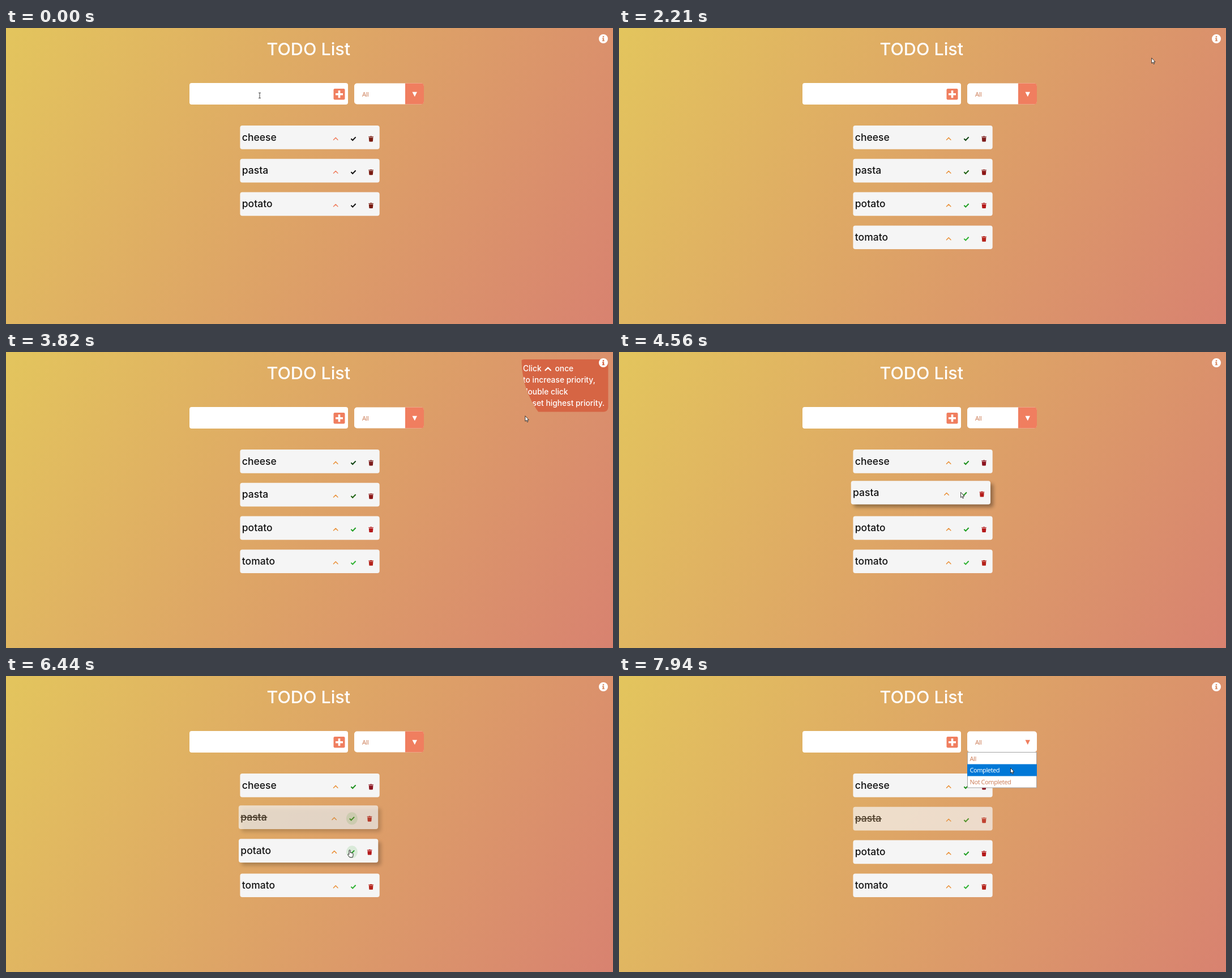
An HTML page for the animation above (8000 ms loop, 1072 by 522 pixels).

```html
<!DOCTYPE html>
<html lang="en">
<head>
<meta charset="utf-8">
<title>TODO List</title>
<style>
  html, body { margin: 0; width: 100%; height: 100%; overflow: hidden; background: #dca266; }
  svg { display: block; width: 100%; height: 100%; }
  text { white-space: pre; }
  .ui { font-family: Inter, sans-serif; font-weight: 500; }
  .form { font-family: "Noto Sans", sans-serif; letter-spacing: -.04em; }
  .opt { font-size: 11px; fill: #cf8460; }
  .line { fill: none; stroke-linecap: round; stroke-linejoin: round; }
</style>
</head>
<body>
<svg id="stage" viewBox="0 0 1072 522" preserveAspectRatio="none">
  <defs>
    <linearGradient id="bg" gradientUnits="userSpaceOnUse" x1="21" y1="-36" x2="1051" y2="558">
      <stop offset="0" stop-color="#e3c55d"/>
      <stop offset="1" stop-color="#d88270"/>
    </linearGradient>
    <filter id="blur" x="-20%" y="-60%" width="140%" height="220%"><feGaussianBlur stdDeviation="3"/></filter>
    <clipPath id="reveal"><circle id="revealDisc" cx="1065" cy="15" r="0"/></clipPath>
  </defs>
  <rect width="1072" height="522" fill="url(#bg)"/>
  <text class="ui" x="460.5" y="48" font-size="30.5" fill="#fff">TODO List</text>

  <rect x="324" y="97" width="280" height="38" rx="4" fill="#fff"/>
  <text id="typed" class="form" x="329" y="125" font-size="22"></text>
  <path id="caret" stroke="#000"/>
  <path id="addFill" d="M573 97H600Q604 97 604 101V131Q604 135 600 135H573Z" fill="#f07e5f"/>
  <rect id="addBox" x="578.5" y="107" width="20" height="19.5" rx="2.2"/>
  <path id="addPlus" d="M582 116.7H595M588.5 110.3V123.2" stroke-width="3.6"/>

  <rect x="615" y="97.5" width="123" height="37" rx="5" fill="#fff"/>
  <text class="form opt" x="629" y="120.5">All</text>
  <path id="arrowFill" d="M705 97.5H733Q738 97.5 738 102.5V129.5Q738 134.5 733 134.5H705Z" fill="#f07e5f"/>
  <path id="arrow" d="M717.5 112.8H726L721.8 121.3Z"/>

  <g id="rows"></g>

  <g id="menu">
    <rect x="615.5" y="134.5" width="122" height="62.5" fill="#fff" stroke="#a3a3a3"/>
    <rect id="pick" x="615" width="123" height="21" fill="#0078d7"/>
  </g>

  <g clip-path="url(#reveal)" fill="#fff">
    <rect x="907" y="13" width="156.5" height="92.5" rx="8" fill="#d66544"/>
    <g id="help" class="ui" font-size="13.8"></g>
    <path class="line" d="M952.5 32.3L957.2 27.6 961.9 32.3" stroke="#fff" stroke-width="2.2"/>
  </g>
  <path fill="#fff" fill-rule="evenodd" d="M1047 19a8 8 0 1 1 16 0a8 8 0 1 1-16 0Z
    M1053.6 15.3a1.4 1.4 0 1 0 2.8 0a1.4 1.4 0 1 0-2.8 0Z
    M1053 17.6H1056.2V21.8H1057.1V23.2H1052.9V21.8H1053.8V19H1053Z"/>

  <circle id="click" r="8" fill="#ffe600" opacity=".7"/>
  <g id="pointer" stroke-linejoin="round">
    <path id="beam" d="M-2-4.6H2M0-4.6V4.6M-2 4.6H2" stroke="#444" fill="none"/>
    <path id="hand" d="M-1.1 7.8V.9a1.1 1.1 0 0 1 2.2 0V4.4L4.6 5.2Q6 5.6 6 7V9.5L5 12.8H0L-3.2 8.5Q-3.5 6.8-2.2 7Z" fill="#fff" stroke="#111" stroke-width=".9"/>
    <path id="tip" d="M0 0V9.4L2.1 7.5 3.5 10.8 5 10.2 3.6 7H6.4Z" fill="#fff" stroke="#111" stroke-width=".8"/>
  </g>
</svg>
<script>
const LOOP = 8000, ADD = 1640, STRIKE = 5950, OPEN = 7330;
const CORAL = '#f07e5f', GREEN = '#12a012';
const $ = id => document.getElementById(id);
const clamp = v => Math.max(0, Math.min(1, v));
const smooth = v => (v = clamp(v), v * v * (3 - 2 * v));
const set = (el, attrs) => { for (const k in attrs) el.setAttribute(k, attrs[k]); };
const show = (el, on) => el.setAttribute('visibility', on ? 'visible' : 'hidden');
const within = (t, spans) => spans.some(([a, b]) => t >= a && t < b);

// strength of a hover that starts at a and ends at b, with a fade of d ms
const hover = (t, spans, d = 200) =>
  spans.reduce((m, [a, b]) => Math.max(m, smooth((t - a) / d) * (1 - smooth((t - b) / d))), 0);

const rows = [
  { name: 'cheese', over: [[4760, 5610], [6850, 6930]], check: [[4900, 5550]],
    tick: ['#111', '#0c4210', '#1c8f1c'], bin: ['#7a1c12', '#7d1c1c', '#8c1420'] },
  { name: 'pasta', over: [[4440, 4750], [5620, 6335], [6720, 6840]], check: [[5720, 6335]],
    tick: ['#111', '#1f6212', '#1c8f16'], bin: ['#7a1c12', '#8c1717', '#b51c1a'] },
  { name: 'potato', over: [[6350, 6710]], check: [[6350, 6640]],
    tick: ['#111', '#1d9e20', '#1d9e20'], bin: ['#7a1c12', '#b51a1c', '#b51a1c'] },
  { name: 'tomato', over: [], check: [],
    tick: ['#111', '#2bb12e', '#2bb12e'], bin: ['#7a1c12', '#b5221a', '#b5221a'] }
];

$('rows').innerHTML = rows.map((r, i) => `<g transform="translate(413.4 ${172 + i * 58.8})">
  <rect class="shade" x="5" y="5" width="246.3" height="41.7" rx="4" filter="url(#blur)"/>
  <g class="card">
    <rect width="246.3" height="41.7" rx="4" fill="#f5f5f5"/>
    <text class="ui" x="3.4" y="26.6" font-size="17.5" fill="#111">${r.name}</text>
    <path class="strike" d="M3.4 20.9H50.5" stroke="#111" stroke-width="1.5"/>
    <path class="up line" d="M165-0" stroke-width="1.5"/>
    <ellipse class="disc" cx="200" cy="23" rx="10" ry="11" fill="${GREEN}"/>
    <path class="tick" d="M196 23.2L198.8 26 204.2 20.4" fill="none" stroke-width="2"/>
    <path class="bin" transform="translate(231.2 23.4)" d="M-4.3-4.1H-1.6L-1-4.8H1L1.6-4.1H4.3V-2.9H-4.3Z
      M-3.8-2.2H3.8L3.3 4.1Q3.2 5 2.3 5H-2.3Q-3.2 5-3.3 4.1Z"/>
  </g></g>`).join('');

rows.forEach((r, i) => {
  r.el = $('rows').children[i];
  for (const part of ['shade', 'card', 'strike', 'up', 'disc', 'tick', 'bin'])
    r[part + 'El'] = r.el.querySelector('.' + part);
  r.upEl.setAttribute('d', 'M165.1 25.2L168.8 21.4 172.5 25.2');
});

$('help').innerHTML = ['Click', 'to increase priority,', 'double click', 'to set highest priority.']
  .map((s, i) => `<text x="913" y="${34.3 + i * 20.1}">${s}</text>`).join('') + '<text x="969.5" y="34.3">once</text>';

const options = ['All', 'Completed', 'Not Completed'].map((s, i) => {
  const el = document.createElementNS('http://www.w3.org/2000/svg', 'text');
  set(el, { class: 'form opt', x: 619.5, y: 149.5 + i * 20.8 });
  el.textContent = s;
  return $('menu').appendChild(el);
});

// pointer path: time, x, y
const path = [
  [0, 448, 119], [1000, 448, 119], [1350, 583, 119], [1700, 583, 119], [2310, 1010, 40],
  [2700, 1045, 23], [2820, 1060, 19], [3620, 1060, 19], [3820, 917.5, 112.5], [4410, 602, 264],
  [4700, 605, 232], [4980, 607, 194], [5530, 607, 194], [5540, 607, 204], [5640, 607, 222],
  [5800, 607, 250], [6240, 607, 250], [6440, 607, 307], [6600, 607, 307], [7080, 700, 118],
  [7200, 712, 114], [7420, 712, 114], [7800, 695, 158], [7940, 691.5, 162], [LOOP, 691.5, 162]
];

function pointerAt(t) {
  const i = Math.max(1, path.findIndex(p => p[0] > t));
  const [a, b] = [path[i - 1], path[i]], k = (t - a[0]) / (b[0] - a[0]);
  return [a[1] + (b[1] - a[1]) * k, a[2] + (b[2] - a[2]) * k];
}

const keys = [90, 190, 300, 470, 720, 820];

function drawInput(t) {
  const text = t < ADD ? 'tomato'.slice(0, keys.filter(k => t >= k).length) : '';
  $('typed').textContent = text;
  const x = 329.5 + (text ? $('typed').getComputedTextLength() : 0);
  $('caret').setAttribute('d', `M${x} 102V130`);
  show($('caret'), t >= 50 && t < 1350);
  const k = hover(t, [[1270, 1730]], 130);
  $('addFill').setAttribute('opacity', k);
  $('addBox').setAttribute('fill', k > .5 ? '#fff' : CORAL);
  $('addPlus').setAttribute('stroke', k > .5 ? CORAL : '#fff');
}

function drawRows(t) {
  const phase = t < ADD ? 0 : t < 4480 ? 1 : 2;
  rows.forEach((r, i) => {
    show(r.el, i < 3 || t >= ADD);
    const lift = hover(t, r.over), disc = hover(t, r.check) ** 2.5;
    const move = `translate(${-5.6 * lift} ${-5.6 * lift})`;
    const done = i === 1 && t >= STRIKE;
    set(r.shadeEl, { transform: move, opacity: .5 * lift * (done ? .7 : 1) });
    set(r.cardEl, { transform: move, opacity: done ? .7 : 1 });
    r.strikeEl.setAttribute('opacity', done ? 1 : 0);
    r.upEl.setAttribute('stroke', phase ? '#ea9038' : CORAL);
    r.discEl.setAttribute('opacity', disc);
    r.tickEl.setAttribute('stroke', disc > .5 ? '#fff' : r.tick[phase]);
    r.binEl.setAttribute('fill', r.bin[phase]);
  });
}

function drawSelect(t, y) {
  const k = hover(t, [[7010, LOOP + 500]], 150);
  $('arrowFill').setAttribute('opacity', 1 - k);
  $('arrow').setAttribute('fill', k > .5 ? CORAL : '#fff');
  const open = t >= OPEN, pick = y > 155 ? 1 : 0;
  $('menu').setAttribute('display', open ? 'inline' : 'none');
  $('pick').setAttribute('y', 134.8 + pick * 20.7);
  options.forEach((o, i) => { o.style.fill = i === pick ? '#fff' : ''; });
}

function drawPointer(t, x, y) {
  set($('pointer'), { transform: `translate(${x} ${y})` });
  const hidden = t >= 50 && t < 1000;
  const beam = t < 1290 && !hidden;
  const hand = within(t, [[1290, 1720], [2760, 3650], [4880, 5535], [5730, 6640]]);
  show($('beam'), beam);
  show($('hand'), hand);
  show($('tip'), !beam && !hand && !hidden);
  set($('click'), { cx: x, cy: y });
  show($('click'), within(t, [[1510, 1680], [STRIKE - 60, STRIKE + 90], [OPEN - 60, OPEN + 60]]));
}

function draw(t) {
  const [x, y] = pointerAt(t);
  drawInput(t);
  drawRows(t);
  drawSelect(t, y);
  const open = t < 3743 ? clamp((t - 2770) / 500) : 1 - clamp((t - 3743) / 500);
  $('revealDisc').setAttribute('r', 183 * open);
  drawPointer(t, x, y);
}

const start = performance.now();
function tick() {
  draw((performance.now() - start) % LOOP);
  requestAnimationFrame(tick);
}
tick();
</script>
</body>
</html>
```
